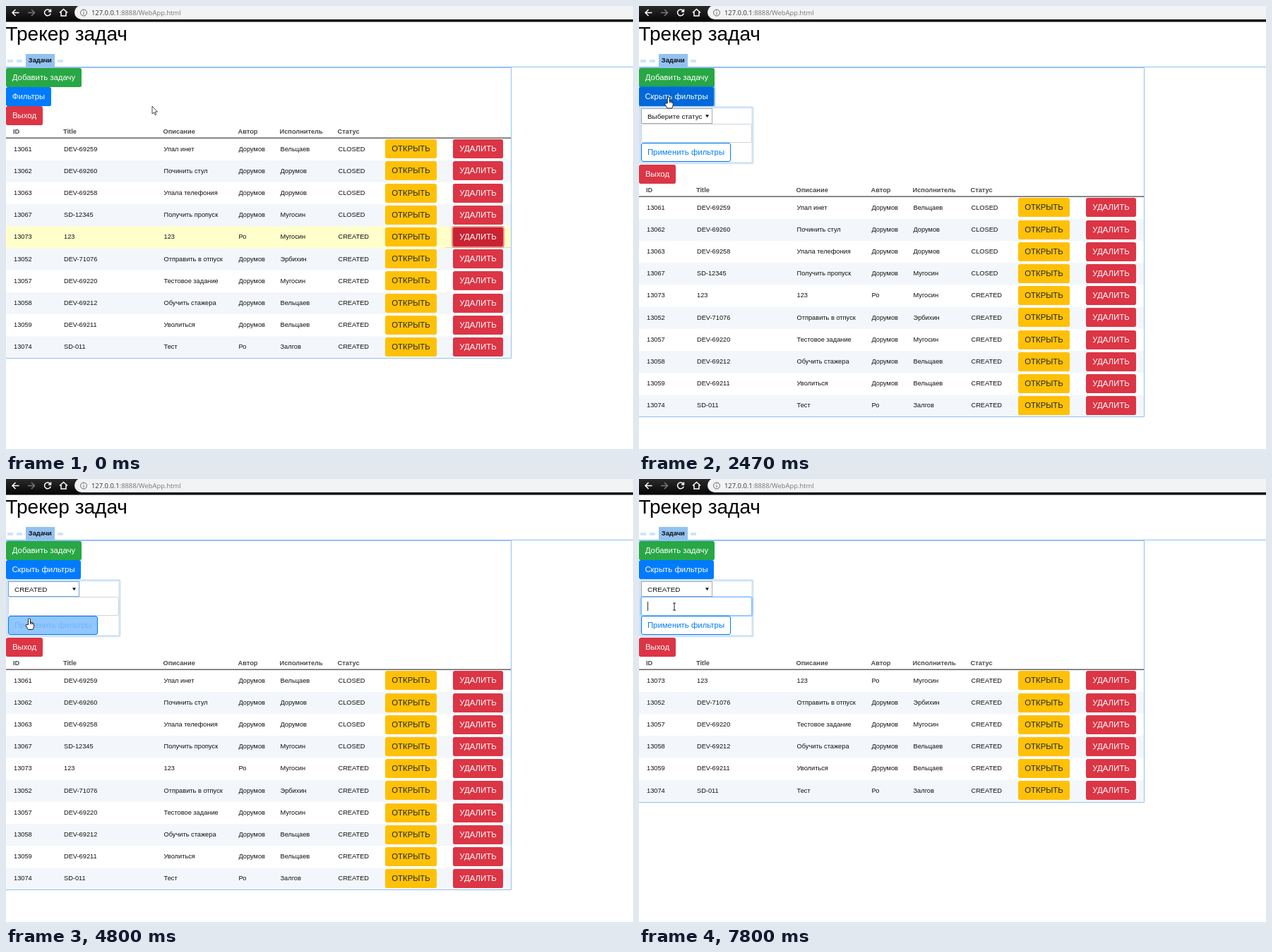
Animation of 888 by 631 pixels, one loop 8 s. Source, as an HTML page:

```html
<!DOCTYPE html>
<html lang="ru">
<head>
<meta charset="utf-8">
<title>Трекер задач</title>
<style>
html, body { margin: 0; width: 100%; height: 100%; overflow: hidden; background: #fff; }
svg { display: block; font-family: "Liberation Sans", Arial, sans-serif; }
</style>
</head>
<body>
<svg id="stage" width="888" height="631" viewBox="0 0 888 631"></svg>
<script>
const LOOP = 8000, STEPS_PER_MS = 0.015;
const GREEN = '#28a745', BLUE = '#007bff', RED = '#dc3545', YELLOW = '#ffc107';
const EDGE = '#92c1f0', PALE = '#d0e4f6', INK = '#212529';
const ROW_HEIGHT = 31.2, FILTER_HEIGHT = 83, BUTTON_HEIGHT = 27;

// Moments of the interaction, in ms
const AT = {
  addEnter: 1060, addLeave: 1300, filterEnter: 1390, open: 1790, filterLeave: 2790,
  drop: 3190, optionEnter: 4060, pick: 4390, applyEnter: 4735, apply: 5260,
  filtered: 5590, applyLeave: 6390, inputFocus: 6730
};

const columns = [11, 82, 223.5, 329.5, 388.5, 470.5];
const headers = ['ID', 'Title', 'Описание', 'Автор', 'Исполнитель', 'Статус'];
const tasks = [
  ['13061', 'DEV-69259', 'Упал инет', 'Дорумов', 'Вельцаев', 'CLOSED'],
  ['13062', 'DEV-69260', 'Починить стул', 'Дорумов', 'Дорумов', 'CLOSED'],
  ['13063', 'DEV-69258', 'Упала телефония', 'Дорумов', 'Дорумов', 'CLOSED'],
  ['13067', 'SD-12345', 'Получить пропуск', 'Дорумов', 'Мугосин', 'CLOSED'],
  ['13073', '123', '123', 'Ро', 'Мугосин', 'CREATED'],
  ['13052', 'DEV-71076', 'Отправить в отпуск', 'Дорумов', 'Эрбихин', 'CREATED'],
  ['13057', 'DEV-69220', 'Тестовое задание', 'Дорумов', 'Мугосин', 'CREATED'],
  ['13058', 'DEV-69212', 'Обучить стажера', 'Дорумов', 'Вельцаев', 'CREATED'],
  ['13059', 'DEV-69211', 'Уволиться', 'Дорумов', 'Вельцаев', 'CREATED'],
  ['13074', 'SD-011', 'Тест', 'Ро', 'Залгов', 'CREATED']
];
const options = ['Выберите статус', 'CREATED', 'IN_PROGRESS', 'CLOSED'];

// Pointer hot spot: time, x, y
const track = [
  [0, 207, 142], [400, 207, 142], [1000, 92, 112], [1200, 68, 104], [1333, 62, 116],
  [1600, 44, 127], [1700, 42, 128], [2400, 42, 128], [2467, 41.7, 129], [2800, 37, 141],
  [3130, 32, 152], [3467, 32, 152], [4000, 29, 178], [4200, 30, 184], [4400, 30, 184],
  [4800, 33, 197.5], [5000, 35, 207], [6200, 35, 207], [6400, 41, 194], [6667, 50, 181],
  [LOOP, 50, 181]
];
const cursorKinds = [
  [0, 'arrow'], [AT.addEnter, 'hand'], [AT.filterLeave, 'arrow'], [AT.pick, 'beam'],
  [AT.applyEnter, 'hand'], [AT.applyLeave, 'beam']
];
const cursors = {
  arrow: `<path d="M0 0V11L2.5 8.7 4.2 12.6 5.8 12 4.1 8.1H7.5Z" fill="#fff" stroke="#222" stroke-width=".8"/>`,
  hand: `<path d="M-1.5 9V1Q0-1 1.5 1V5.5L5 6.5Q6.5 7 6.5 9V12L5 16H-1.5L-5 10.5Q-5 8-3 9Z
    M1.5 5.5V8.5M3.2 6V8.5M5 6.5V9" fill="#fff" stroke="#111" stroke-width=".9"/>`,
  beam: `<path d="M-2-5H2M0-5V5M-2 5H2" stroke="#222" fill="none"/>`
};

const fade = (t, start) => Math.min(1, Math.max(0, (t - start) / 150));
const pulse = (t, start, end) => fade(t, start) - fade(t, end);
const mix = (a, b, p) => `color-mix(in srgb, ${b} ${p * 100}%, ${a})`;

const rect = (x, y, w, h, fill, more = '') =>
  `<rect x="${x}" y="${y}" width="${w}" height="${h}" fill="${fill}" ${more}/>`;
const frameRect = (x, y, w, h, fill, edge, radius = 0) =>
  rect(x + .5, y + .5, w - 1, h - 1, fill, `rx="${radius}" stroke="${edge}"`);
const line = (x1, y1, x2, y2, color) =>
  `<path d="M${x1} ${y1}L${x2} ${y2}" stroke="${color}"/>`;
const text = (x, y, size, label, fill = '#111', more = '') =>
  `<text x="${x}" y="${y}" font-size="${size}" fill="${fill}" ${more}>${label}</text>`;

function button(x, y, w, label, fill, { color = '#fff', ring = 0, ringColor = BLUE, border } = {}) {
  const h = BUTTON_HEIGHT;
  const halo = ring ? rect(x - 2, y - 2, w + 4, h + 4, ringColor, `rx="4" opacity="${ring * 0.5}"`) : '';
  const body = border ? frameRect(x, y, w, h, fill, border, 2.5) : rect(x, y, w, h, fill, 'rx="2.8"');
  return halo + body + text(x + w / 2, y + 17.2, 11.4, label, color, 'text-anchor="middle"');
}

function browserBar() {
  return `<linearGradient id="bar" x2="0" y2="1"><stop stop-color="#2a2a2a"/><stop offset="1" stop-color="#050505"/></linearGradient>`
    + rect(0, 0, 888, 22.5, 'url(#bar)')
    + `<path d="M888-1H107A10 10 0 0 0 107 19H888Z" fill="#f1f3f4"/>`
    + `<g fill="none" stroke="#fff" stroke-width="1.5">
      <path d="M18.5 9.5H9M13.5 5L9 9.5L13.5 14"/>
      <path d="M31 9.5H40.5M36 5L40.5 9.5L36 14" stroke="#777"/>
      <path d="M62.5 6.8A4.4 4.4 0 1 0 63.2 10.5M63.5 4.5V8H60"/>
      <path d="M76 9.5L81.5 4.5L87 9.5M78 8.5V14H85V8.5"/></g>`
    + `<g fill="none" stroke="#666"><circle cx="110" cy="9.5" r="4.5"/><path d="M110 8.8V12M110 6.5V7.6"/></g>`
    + text(121, 12.8, 9.4, '127.0.0.1<tspan fill="#777">:8888/WebApp.html</tspan>', '#333',
      'font-family="Open Sans, sans-serif"');
}

function pageHead() {
  return text(-.5, 49, 28, 'Трекер задач', '#000')
    + [2, 15, 73].map(x => rect(x, 76, 8, 4, PALE)).join('')
    + rect(28, 68, 41, 18, EDGE)
    + text(48.3, 80.2, 9.3, 'Задачи', '#111', 'font-weight="bold" text-anchor="middle"')
    + line(0, 86.5, 888, 86.5, EDGE) + line(0, 629.5, 888, 629.5, '#b4d2ea');
}

function table(t, shift) {
  const rows = t < AT.filtered ? tasks : tasks.slice(4);
  const top = 187.6 + shift;
  const bottom = Math.floor(top + rows.length * ROW_HEIGHT + .2) + .5;
  let out = headers.map((h, i) => text(columns[i] - 1, 180.7 + shift, 9.25, h, '#4b4a4a', 'font-weight="bold"')).join('');
  rows.forEach((row, i) => {
    const y = top + i * ROW_HEIGHT, buttonY = Math.round(y + 1.7), selected = !shift && i === 4;
    out += rect(0, y, 715, ROW_HEIGHT, selected ? '#ffffcc' : i % 2 ? '#f3f7fb' : '#fff');
    if (selected) out += line(622, y + 30.1, 715, y + 30.1, '#d8dfc8');
    out += row.map((cell, c) => text(columns[c], y + 17.9, 9.25, cell)).join('')
      + button(537, buttonY, 73, 'ОТКРЫТЬ', YELLOW, { color: INK })
      + button(633, buttonY, 71, 'УДАЛИТЬ', selected ? '#c82333' : RED, { ring: selected ? 1 : 0, ringColor: RED });
  });
  return out + rect(0, top - 1.1, 715, 1.4, '#55575b')
    + `<path d="M0 87.5H715.5V${bottom}H0" fill="none" stroke="${EDGE}"/>`;
}

function filterPanel(t) {
  const picked = t >= AT.pick;
  const hover = pulse(t, AT.applyEnter, AT.applyLeave);
  const focus = fade(t, AT.inputFocus);
  const selectEdge = t >= AT.drop && t < AT.apply ? '#6f9fe0' : '#a9a9a9';
  let out = rect(1.5, 143.7, 159.5, 79, '#fff', `rx="1" stroke="${PALE}" stroke-width="3"`)
    + frameRect(3, 145, 101, 22, '#fff', selectEdge)
    + text(12, 159.6, 9.9, picked ? options[1] : options[0])
    + `<path d="M94 154.3H99L96.5 158.3Z" fill="#111"/>`;
  if (focus) out += rect(1.5, 166, 160, 29.5, BLUE, `rx="4" opacity="${focus * .25}"`);
  out += frameRect(3, 167, 157, 27, '#fff', mix('#ced4da', '#80bdff', focus), 2.5);
  const caretOn = t >= AT.inputFocus && Math.floor((t - AT.inputFocus) / 533) % 2 === 0;
  if (caretOn) out += rect(12, 174, 1, 13, '#333');
  out += button(3, 194, 127, 'Применить фильтры', mix('#fff', BLUE, hover),
    { color: mix(BLUE, '#fff', hover), border: BLUE, ring: pulse(t, AT.apply, AT.inputFocus) });
  return out;
}

function dropdown(t) {
  const active = t < AT.optionEnter ? 0 : 1;
  return frameRect(3, 167, 100, 53, '#fff', '#5b9be0')
    + rect(3, 167.5 + active * 12.5, 100, 13.2, '#1e90ff')
    + options.map((o, i) => text(12, 177.5 + i * 12.5, 9.95, o, i === active ? '#fff' : '#111')).join('');
}

function pointer(t) {
  const i = track.findIndex((p, n) => t >= p[0] && t < track[n + 1][0]);
  const [t0, x0, y0] = track[i], [t1, x1, y1] = track[i + 1];
  const p = (t - t0) / (t1 - t0);
  const kind = cursorKinds.findLast(c => t >= c[0])[1];
  return `<g transform="translate(${x0 + (x1 - x0) * p} ${y0 + (y1 - y0) * p})">${cursors[kind]}</g>`;
}

function scene(t) {
  const open = t >= AT.open, shift = open ? FILTER_HEIGHT : 0;
  const addFill = mix(GREEN, '#218838', pulse(t, AT.addEnter, AT.addLeave));
  const filterFill = mix(BLUE, '#0069d9', pulse(t, AT.filterEnter, AT.filterLeave));
  return browserBar() + pageHead() + table(t, shift)
    + button(0, 88, 107, 'Добавить задачу', addFill)
    + button(0, 115, open ? 106 : 64, open ? 'Скрыть фильтры' : 'Фильтры', filterFill,
      { ring: pulse(t, AT.open, AT.drop) })
    + (open ? filterPanel(t) : '')
    + button(0, 142 + shift, 52, 'Выход', RED)
    + (t >= AT.drop && t < AT.pick ? dropdown(t) : '')
    + pointer(t);
}

const stage = document.getElementById('stage');
let shown = -1;
function frame() {
  // The screen refreshes fifteen times a second
  const step = Math.floor((performance.now() % LOOP) * STEPS_PER_MS + .06);
  if (step !== shown) {
    shown = step;
    stage.innerHTML = scene(Math.min(step / STEPS_PER_MS, LOOP - 1));
  }
  requestAnimationFrame(frame);
}
frame();
</script>
</body>
</html>
```
